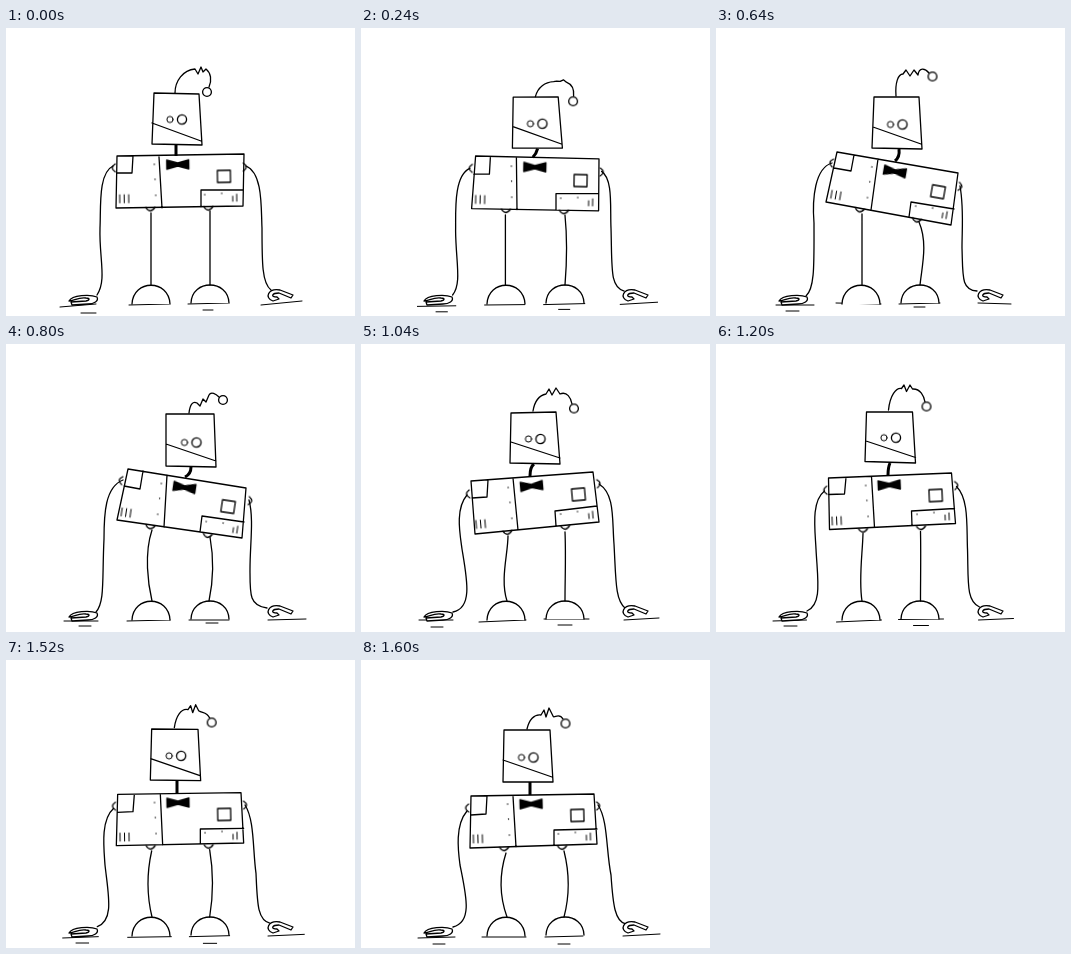
Animation of 349x288 px, one loop 1.68 s. Source, as an HTML page without scripts:

```html
<!DOCTYPE html>
<html lang="en">
<head>
<meta charset="utf-8">
<title>Swaying robot</title>
<style>
html, body { margin: 0; width: 100%; height: 100%; overflow: hidden; background: #fff; }
svg { display: block; width: 100vw; height: 100vh; }
.ink { fill: none; stroke: #000; stroke-width: 1.3; stroke-linecap: round; stroke-linejoin: round; }
.solid { fill: #000; }
.paper { fill: #fff; }
.thin { stroke-width: 1; }
.ink * { animation: 1680ms infinite; }

/* Each pose is reached in whole 80 ms drawings. */
#antenna { animation-name: antenna; }
@keyframes antenna {
  0% { animation-timing-function: steps(5); d: path("M169 65C169 53 177 42 189 41L192 46 195 39 197 44 200 41C205 45 206 52 203 59"); }
  23.8% { animation-timing-function: steps(3); d: path("M178 71C182 63 189 62 195 62L198 58 202 63 206 57 209 63C215 64 218 68 219 74"); }
  38.09% { animation-timing-function: steps(2); d: path("M180 68C179 55 182 46 187 46L190 42 194 48 198 42 202 47C203 39 209 40 213 45"); }
  47.61% { animation-timing-function: steps(3); d: path("M183 69C184 60 187 57 191 59L194 62 197 55 200 58 203 51C205 47 210 50 213 53"); }
  61.9% { animation-timing-function: steps(4); d: path("M172 67C174 55 180 51 185 50L188 45 191 51 195 44 199 50C206 47 210 54 211 60"); }
  80.95% { animation-timing-function: steps(3); d: path("M173 65C174 48 180 36 186 39L188 37 190 44 193 38 194 40C203 42 206 50 207 56"); }
  95.23%, 100% { animation-timing-function: steps(1); d: path("M166 69C168 60 173 54 180 55L183 50 185 57 188 48 192 56C193 59 198 52 202 59"); }
}

#ball { animation-name: ball; }
@keyframes ball {
  0% { animation-timing-function: steps(5); transform: translate(201px, 64px); }
  23.8% { animation-timing-function: steps(3); transform: translate(219.5px, 79.5px); }
  38.09% { animation-timing-function: steps(2); transform: translate(216.5px, 48.5px); }
  47.61% { animation-timing-function: steps(3); transform: translate(217px, 56px); }
  61.9% { animation-timing-function: steps(4); transform: translate(213px, 64.5px); }
  80.95% { animation-timing-function: steps(3); transform: translate(208px, 60.5px); }
  95.23%, 100% { animation-timing-function: steps(1); transform: translate(204.5px, 63.5px); }
}

#head { animation-name: head; }
@keyframes head {
  0% { animation-timing-function: steps(5); d: path("M148 65L193 66 196 117 146 116ZM146 95L195 113"); }
  23.8% { animation-timing-function: steps(3); d: path("M155 72L200 71 205 122 155 123ZM156 101Q172 104 204 118"); d: path("M155 72L200 71 205 122 155 123ZM156 101L204 118"); }
  38.09% { animation-timing-function: steps(2); d: path("M158 69L203 69 206 121 156 120ZM157 99L205 116"); }
  47.61% { animation-timing-function: steps(3); d: path("M160 70L208 70 210 123 160 122ZM160 100L210 117"); }
  61.9% { animation-timing-function: steps(4); d: path("M150 69L195 68 199 120 149 119ZM150 98L199 114"); }
  80.95% { animation-timing-function: steps(3); d: path("M151 67L198 68 200 118 149 116ZM150 96L200 113"); }
  95.23%, 100% { animation-timing-function: steps(1); d: path("M143 70L189 70 192 122 142 122ZM142 100L191 117"); }
}

#eyes { animation-name: eyes; }
@keyframes eyes {
  0% { animation-timing-function: steps(5); transform: translate(170px, 91.5px); }
  23.8% { animation-timing-function: steps(3); transform: translate(179px, 98.5px); }
  38.09% { animation-timing-function: steps(2); transform: translate(180.5px, 96.5px); }
  47.61% { animation-timing-function: steps(3); transform: translate(184.5px, 98.5px); }
  61.9% { animation-timing-function: steps(4); transform: translate(173.5px, 95px); }
  80.95% { animation-timing-function: steps(3); transform: translate(174.5px, 92.5px); }
  95.23%, 100% { animation-timing-function: steps(1); transform: translate(166.5px, 97.5px); }
}

#neck { animation-name: neck; stroke-width: 3; stroke-linecap: butt; }
@keyframes neck {
  0% { animation-timing-function: steps(5); d: path("M170 117Q170 122 170 128"); }
  23.8% { animation-timing-function: steps(3); d: path("M181 123Q179 128 173 130"); }
  38.09% { animation-timing-function: steps(2); d: path("M183 121Q184 129 179 133"); }
  47.61% { animation-timing-function: steps(3); d: path("M185 123Q185 130 179 133"); }
  61.9% { animation-timing-function: steps(4); d: path("M173 120Q169 123 169 132"); }
  80.95% { animation-timing-function: steps(3); d: path("M175 118Q175 124 175 130"); }
  95.23%, 100% { animation-timing-function: steps(1); d: path("M169 122Q169 128 169 135"); }
}

/* Outline, divider, corner patch, lower panel */
#body { animation-name: body; }
@keyframes body {
  0% { animation-timing-function: steps(5); d: path("M111 128L238 126 237 178 110 180ZM153 129L156 180M127 128L126 145 111 145M237 162L195 162 195 179"); }
  23.8% { animation-timing-function: steps(3); d: path("M117 128L238 134 238 186 111 181ZM157 130L156 183M131 129L130 147 114 147M238 168L195 168 195 184"); }
  38.09% { animation-timing-function: steps(2); d: path("M121 124L242 145 235 197 110 174ZM162 131L155 182M138 127L135 143 118 140M238 181L195 174 193 189"); }
  47.61% { animation-timing-function: steps(3); d: path("M122 125L240 144 236 194 111 176ZM161 131L158 183M137 127L134 145 118 142M238 178L196 172 194 188"); }
  61.9% { animation-timing-function: steps(4); d: path("M110 137L232 128 238 178 114 190ZM152 134L157 186M127 136L126 153 111 154M236 162L194 167 195 182"); }
  80.95% { animation-timing-function: steps(3); d: path("M115 131L239 130 241 181 113 181ZM159 131L160 181M133 131L131 147 114 147M241 167L197 167 197 181"); }
  95.23%, 100% { animation-timing-function: steps(1); d: path("M110 136L233 134 236 184 109 188ZM152 136L155 187M126 136L125 154 110 155M236 169L193 170 193 185"); }
}

#fittings { animation-name: fittings; }
@keyframes fittings {
  0% { animation-timing-function: steps(5); transform: translate(173.5px, 153px) rotate(-.8deg); }
  23.8% { animation-timing-function: steps(3); transform: translate(176px, 157.5px) rotate(2.5deg); }
  38.09% { animation-timing-function: steps(2); transform: translate(177.5px, 160px) rotate(10deg); }
  47.61% { animation-timing-function: steps(3); transform: translate(177.5px, 160px) rotate(8.5deg); }
  61.9% { animation-timing-function: steps(4); transform: translate(173.5px, 158.3px) rotate(-5deg); }
  80.95% { animation-timing-function: steps(3); transform: translate(177.3px, 156.5px) rotate(0deg); }
  95.23%, 100% { animation-timing-function: steps(1); transform: translate(172px, 160.5px) rotate(-1.4deg); }
}

#arms { animation-name: arms; }
@keyframes arms {
  0% { animation-timing-function: steps(5); d: path("M107 138C92 145 95 180 94 200C93 230 101 252 91 267M240 138C257 145 255 180 256 200C256 235 256 255 265 262"); }
  23.8% { animation-timing-function: steps(3); d: path("M110 142C92 150 95 190 95 205C96 235 101 258 92 267M241 147C249 155 245 180 246 200C248 245 244 262 262 264"); }
  38.09% { animation-timing-function: steps(2); d: path("M116 135C99 140 96 170 98 195C98 235 99 260 90 268M244 158C248 180 246 200 246 220C247 248 245 262 261 263"); }
  47.61% { animation-timing-function: steps(3); d: path("M117 136C99 143 98 170 98 195C96 235 99 258 90 268M243 156C248 175 244 200 244 225C244 250 243 262 261 264"); }
  61.9% { animation-timing-function: steps(4); d: path("M106 151C94 165 99 190 101 205C106 235 112 264 92 268M238 140C254 150 251 175 253 200C255 235 254 256 264 264"); }
  80.95% { animation-timing-function: steps(3); d: path("M111 143C96 150 99 180 99 205C97 235 101 256 90 266M243 145C252 160 250 190 250 210C250 240 246 258 263 262"); }
  95.23%, 100% { animation-timing-function: steps(1); d: path("M106 151C94 165 97 190 99 205C105 235 112 262 92 267M237 145C247 160 245 190 250 215C252 245 254 262 265 264"); }
}

#legs { animation-name: legs; }
@keyframes legs {
  0% { animation-timing-function: steps(5); d: path("M145 185C145 210 145 235 145 257M204 183C204 210 204 235 204 257"); }
  23.8% { animation-timing-function: steps(3); d: path("M144 188C144 210 144 235 144 257M204 190C208 212 207 235 204 257"); }
  38.09% { animation-timing-function: steps(2); d: path("M146 186C146 210 146 235 146 257M203 194C212 215 206 238 204 257"); }
  47.61% { animation-timing-function: steps(3); d: path("M146 186C138 210 142 240 146 257M204 193C208 215 207 238 203 257"); }
  61.9% { animation-timing-function: steps(4); d: path("M147 192C147 210 139 235 146 257M204 188C205 210 204 235 204 257"); }
  80.95% { animation-timing-function: steps(3); d: path("M147 187C146 210 146 235 146 257M205 187C205 210 205 235 205 257"); }
  95.23%, 100% { animation-timing-function: steps(1); d: path("M145 193C138 215 138 235 146 257M203 191C209 215 208 238 203 257"); }
}

#ground { animation-name: ground; }
@keyframes ground {
  0% { animation-timing-function: steps(5); d: path("M54 279L90 276M75 285L90 285M123 277L163 276M182 276L222 275M197 282L207 282M255 277L296 273"); }
  23.8% { animation-timing-function: steps(3); d: path("M58 278L98 279M75 283L84 283M124 277L164 277M183 277L225 276M198 281L210 281M262 276L297 275"); }
  38.09% { animation-timing-function: steps(2); d: path("M60 277L98 277M70 283L83 283M120 275L165 276M183 276L224 275M198 279L209 279M262 275L295 276"); }
  47.61% { animation-timing-function: steps(3); d: path("M58 277L92 277M73 282L85 282M121 277L164 276M183 276L223 276M200 279L212 279M262 276L300 275"); }
  61.9% { animation-timing-function: steps(4); d: path("M58 276L92 276M70 283L82 283M118 278L165 276M183 275L228 275M197 281L211 281M263 276L298 274"); }
  80.95% { animation-timing-function: steps(3); d: path("M56 278L89 276M66 281L80 281M123 278L166 276M182 276L227 275M198 282L214 282M262 276L297 275"); }
  95.23%, 100% { animation-timing-function: steps(1); d: path("M57 278L94 277M72 284L84 284M121 277L165 277M184 277L222 276M197 284L209 284M262 276L299 274"); }
}
</style>
</head>
<body>
<svg viewBox="0 0 349 288">
  <g class="ink">
    <path id="ground" class="thin"/>
    <path class="paper" d="M126 276C127 251 163 251 164 276M185 275C186 251 222 251 223 275"/>
    <path id="legs"/>
    <path id="arms"/>
    <path class="paper" d="M63 273C66 267 84 266 91 269C93 273 88 276 82 276L66 277 65 274 80 273C84 272 84 270 80 270C72 269 68 273 63 273Z"/>
    <path class="paper" d="M287 267L274 262C262 260 258 270 267 273L273 271 271 269C264 269 266 265 273 265L285 270Z"/>
    <path id="antenna"/>
    <circle id="ball" class="paper" r="4.4"/>
    <path id="neck"/>
    <path id="head"/>
    <g id="eyes">
      <circle class="thin" cx="-6" r="3.1"/>
      <circle cx="6" r="4.6"/>
    </g>
    <path id="body"/>
    <g id="fittings">
      <path class="solid" d="M-12.500-21L-1.500-18 9.500-21V-12L-1.500-15-12.500-12Z"/>
      <path d="M38-10H51V2H38Z"/>
      <path class="thin" d="M-60 13V21M-55.500 13V21M-51 13V21M53 16V21M57 14V21"/>
      <path d="M-25-17h.1M-24.500-2h.1M-24 14h.1M25 14h.1M42 13h.1"/>
      <path d="M-64-18Q-70-14-64-10M64-17Q70-13 64-9M-34 26Q-30 33-25 26M24 26Q28 33 33 26"/>
    </g>
  </g>
</svg>
</body>
</html>
```
